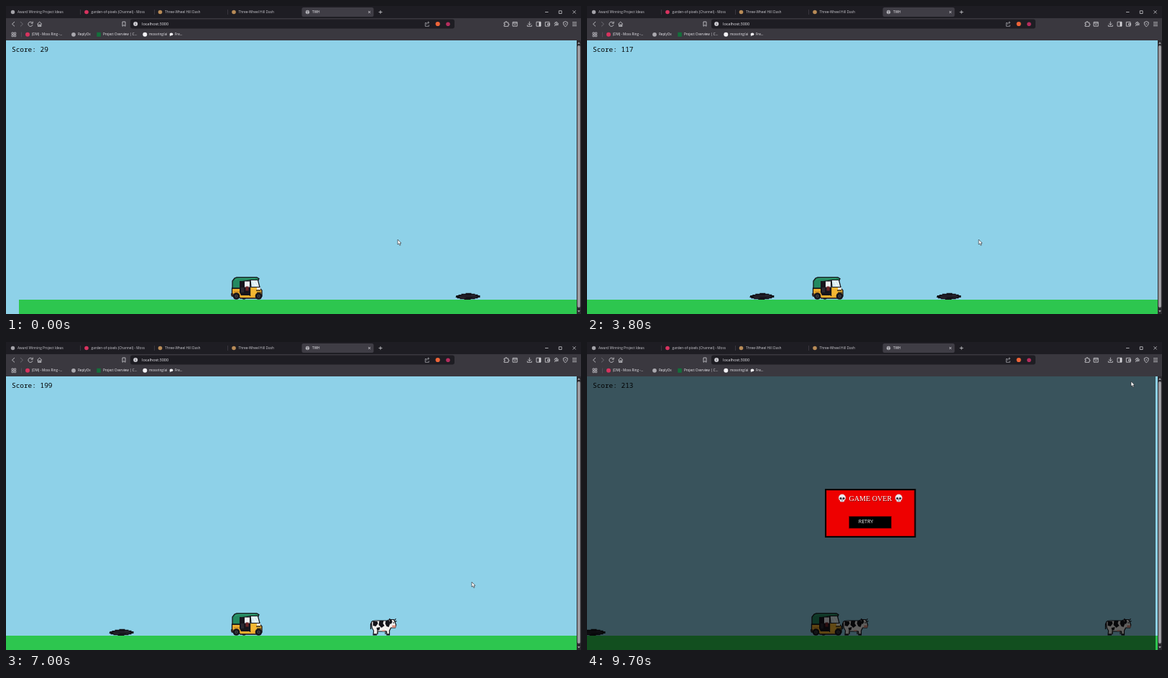
An HTML page with a canvas that plays this animation: 800 by 430 pixels, repeating every 9800 ms.

```html
<!DOCTYPE html>
<html lang="en">
<head>
<meta charset="utf-8">
<title>Rickshaw game</title>
<style>
html, body { margin: 0; width: 100%; height: 100%; overflow: hidden; background: #8ed1e8; }
canvas { display: block; width: 800px; height: 430px; }
</style>
</head>
<body>
<canvas id="stage" width="800" height="430"></canvas>
<script>
const ctx = document.getElementById('stage').getContext('2d');
const LOOP = 9800, STEP = 100, CRASH = 8400;
const SKY = '#8ed1e8', GRASS = '#2dc64f', INK = '#141319';
const BAR = '#3a383f', DARK = '#1e1d23', ICON = '#d4d3d8';
const SANS = '"Open Sans", sans-serif';
const MONO = '"Noto Sans Mono", monospace';
const SERIF = '"Liberation Serif", serif';

// [time, values...] keys, linear in between
const SCROLL = [[0, 0], [1300, 138], [3000, 313], [4800, 507], [7000, 742], [CRASH, 894]];
const POINTER = [[6200, 545, 326], [6900, 648, 335], [7400, 648, 335],
  [8200, 681, 284], [8900, 681, 284], [9700, 757, 55]];
const OBSTACLES = [[hole, 643], [hole, 903], [cow, 1267], [cow, 1633]];
const JUMPS = [2300, 4693], JUMP_SPEED = 541, GRAVITY = 833;

function keyed(keys, t) {
  if (t <= keys[0][0]) return keys[0].slice(1);
  for (let i = 1; i < keys.length; i++) {
    const a = keys[i - 1], b = keys[i];
    if (t <= b[0]) {
      const k = (t - a[0]) / (b[0] - a[0]);
      return a.slice(1).map((v, j) => v + (b[j + 1] - v) * k);
    }
  }
  return keys[keys.length - 1].slice(1);
}

function rect(x, y, w, h, color) {
  ctx.fillStyle = color;
  ctx.fillRect(x, y, w, h);
}
function round(x, y, w, h, r, color) {
  ctx.fillStyle = color;
  ctx.beginPath();
  ctx.roundRect(x, y, w, h, r);
  ctx.fill();
}
function oval(x, y, rx, ry, color) {
  ctx.fillStyle = color;
  ctx.beginPath();
  ctx.ellipse(x, y, rx, ry, 0, 0, 7);
  ctx.fill();
}
const dot = (x, y, r, color) => oval(x, y, r, r, color);
function shape(path, fill, stroke, width = 1) {
  const p = new Path2D(path);
  if (fill) { ctx.fillStyle = fill; ctx.fill(p); }
  if (stroke) { ctx.strokeStyle = stroke; ctx.lineWidth = width; ctx.stroke(p); }
}
const line = (path, color = ICON, width = .8) => shape(path, null, color, width);
function text(str, x, y, font, color) {
  ctx.font = font;
  ctx.fillStyle = color;
  ctx.fillText(str, x, y);
}
function at(x, y, draw) {
  ctx.save();
  ctx.translate(x, y);
  draw();
  ctx.restore();
}

function tabs() {
  rect(0, 0, 800, 17, DARK);
  round(411.5, 2, 100, 13, 2.5, '#3f3d45');
  const label = (str, x, color = '#c9c8ce') => text(str, x, 10.2, '4.8px ' + SANS, color);
  dot(9.5, 8.5, 2.7, '#a3a2a8');
  label('Award Winning Project Ideas', 16);
  dot(112, 8.5, 2.8, '#d8335f');
  ctx.save();
  ctx.beginPath();
  ctx.rect(118, 0, 81, 17);
  ctx.clip();
  label('garden-of-pixels (Channel) - Moss', 118.5);
  ctx.restore();
  for (const x of [214.5, 317]) {
    dot(x, 8.5, 2.8, '#b88b57');
    label('Three-Wheel Hill Dash', x + 6.5);
  }
  for (const x of [103, 206, 308]) rect(x, 5, .7, 7, '#45434c');
  dot(419.5, 8.5, 2.7, '#b9b8be');
  line('M417 7.5h5M417.5 10h4M419.5 6v5', '#66646c', .5);
  label('TWH', 426, '#f0eff4');
  line('M504 7l3 3M507 7l-3 3', '#eeedf2', .7);
  line('M518.5 8.5h5M521 6v5M750 8.5h4.5M769.3 6.7h3.8v3.8h-3.8zM788.5 6.3l4.2 4.2M792.7 6.3l-4.2 4.2', '#e6e5ea', .7);
}

function toolbar() {
  rect(0, 17, 800, 31, BAR);
  round(173, 18.5, 451, 13, 3, DARK);
  line('M12 22l-3.5 3.2L12 28.4');
  line('M20 22l3.5 3.2L20 28.4', '#77757d');
  line('M36.6 23.6A3.1 3.1 0 1 0 37 26.2M37.2 21.6v2.6h-2.6');
  line('M43.5 25.2l3.2-3 3.2 3M44.5 24.8v3.6h4.4v-3.6M46 28v-2h1.5v2');
  line('M162 22h4v6.3l-2-1.7-2 1.7z');
  dot(180.2, 25, 3, '#d2d1d7');
  line('M180.2 24.6v2M180.2 23v.7', DARK, .7);
  text('localhost:3000', 189, 27, '5.5px ' + SANS, '#eeedf2');
  line('M585 23.5h-1.7v4.8h5v-2M585 26c0-2 1-3 3.3-3M587 21.7l1.6 1.4-1.6 1.4', ICON, .6);
  dot(600.7, 25, 3.1, '#ee6438');
  dot(615, 25.2, 2.8, '#b52d5e');
  line('M693 23h2v-1.2h1.6V23h2.2v2h1v1.6h-1V28.4H693v-2h1.1v-1.5H693z');
  line('M705 22.4h6.2v5.8H705zM705 24h6.2M707 26h2.2');
  line('M728.3 21.7v4.6M726.2 24.5l2.1 2.1 2.1-2.1M725.3 26.5v1.8h6v-1.8');
  line('M738 22.2h6v6h-6z');
  rect(741.5, 22.2, 2.5, 6, ICON);
  line('M750.3 22.4h5.7v5.8h-5.7zM753.5 24.5h3v2h-3z');
  line('M763 28l4-4.2M764 22.5l4.5 4.5M763 24.5l3-2.5 2.6 3-3 2.2z');
  line('M778.3 21.6l3 1.2c0 3-.8 4.8-3 5.9-2.2-1.1-3-2.9-3-5.9zM777.3 25h2');
  line('M788 22.8h6M788 25.2h6M788 27.6h6');

  for (const [x, y] of [[8, 37], [11.4, 37], [8, 40.4], [11.4, 40.4]])
    line(`M${x} ${y}h2.3v2.3h-2.3z`, ICON, .7);
  rect(21, 36.5, .7, 7, '#5a5861');
  const label = (str, x) => text(str, x, 41.4, '4.6px ' + SANS, '#eeedf2');
  dot(30, 39.8, 3, '#d8335f');
  label('(DM) - Moss Ring -...', 36);
  dot(94, 39.8, 2.9, '#aaa9af');
  label('ReplyOx', 100);
  rect(126.3, 36.8, 5.5, 6, '#14703b');
  label('Project Overview | C...', 135);
  dot(193.3, 39.8, 3, '#f4f3f7');
  label('mossring/ai', 199);
  oval(230, 39.4, 2.4, 1.8, '#f4f3f7');
  shape('M228 40l-.2 2.3 2-1.2z', '#f4f3f7');
  label('Fre...', 235);
}

function scrollbar() {
  rect(794, 48, 6, 382, '#2b2a2f');
  round(795, 55, 4, 366, 2, '#9c9ba0');
  shape('M795.2 52.8l1.8-2.6 1.8 2.6zM795.2 425l1.8 2.6 1.8-2.6z', '#a9a8ad');
}

// Centre x, standing on the ground line
function hole(x) {
  at(x, 405.5, () => {
    shape('M-16.5-1.5h3v-1h4v-1.2h6v-1h8v1h5v1h4v1.2h3v3h-3v1.2h-4v1h-6v.9h-9v-.9h-6v-1h-4v-1.2h-2z', '#100f15');
    oval(0, .2, 12.5, 3, '#1f1d26');
    rect(-11, 1, 6, 1, '#30282c');
    rect(4, -2, 6, 1, '#302d38');
    rect(-3, 1.4, 9, .9, '#0b0a0f');
  });
}

function cow(x) {
  at(x - 18.5, 386, () => {
    shape('M2.5 5L1 8v7', null, INK, 1.4);
    const body = 'M2 5Q3 3 8 3H24l3-1.5h6l1.5 3 1.7 4.5-1.2 4H29l-2 4v6h-3.5l-.5-5H11l-2 5H4.5l.5-6Q2 13 2 8z';
    shape(body, '#f2efed', INK, 1.2);
    shape('M4 4h6l1 3-3 4-4-1zM13 3h6l-1 4 2 3-4 3-4-4zM22 3h4l2 4-2 5-3-1-2-4zM27 2h3l1 3-2 3-2-2zM9 13l5-1-1 4-3 1z', INK);
    rect(30.8, 9.5, 5, 3.2, '#d98d80');
    rect(32, 5.2, 1.3, 1.6, INK);
    rect(17, 16, 4, 2, '#dc9f94');
    shape('M26.5 4l-2-1.8M28 2l-1-2M34 2.4l2-2M34.5 4.3l2.5-.6', null, INK, 1.3);
    rect(4.5, 21.3, 4.2, 1.8, INK);
    rect(23.2, 21.3, 4.2, 1.8, INK);
    shape('M10.5 17v5M21.5 17v5', null, '#4a4548', 1.6);
  });
}

function wheel(x, y, r) {
  dot(x, y, r, INK);
  dot(x, y, r * .48, '#44434b');
  dot(x, y, r * .2, '#15141a');
}

function rickshaw(x, y) {
  at(x, y, () => {
    wheel(18, 28.8, 3);
    shape('M1.5 16H40l3 3v8H38l-3 3H13L10 27H1.5z', '#eeae2f', INK, 1.3);
    shape('M2 16V6L5 2 8 .8H36l3 2-1 2H27L13 7v9z', '#23895f', INK, 1.3);
    line('M6 4.5Q9 2.5 13 2.5H34', '#35a578', .9);
    shape('M12 6h15v20H14l-2-4z', '#17151c');
    rect(19, 6.5, 7, 8, '#eeeff1');
    shape('M20.5 13.5h4v6h-4z', '#6e2426');
    rect(14, 15, 4, 7, '#2b2830');
    shape('M27 4.5h10.5l2.5 10H28z', '#d9edf2', INK, 1.2);
    line('M31 6l4 7M35 6l2.5 5', '#ffffff', 1);
    shape('M27 15h11l3 3-3 8H27z', '#f3b733');
    rect(36, 15, 5, 3, '#f2eee2');
    rect(35, 18.5, 6, 1.2, INK);
    rect(4, 20.5, 8, 1, '#b87920');
    line('M26.6 5v22M36 22h6', INK, 1.2);
    rect(0, 23, 3, 3.5, '#352a2c');
    wheel(7.5, 27, 4.8);
    wheel(38.5, 27, 4.8);
  });
}

function jumpHeight(t) {
  for (const start of JUMPS) {
    const s = (t - start) / 1000;
    const h = JUMP_SPEED * s - GRAVITY * s * s / 2;
    if (s > 0 && h > 0) return h;
  }
  return 0;
}

function scoreAt(t) {
  const alive = Math.min(t, CRASH);
  return 29 + Math.floor(alive / 100) + 50 * JUMPS.filter(j => alive > j).length;
}

function skull(x, y) {
  at(x, y, () => {
    dot(0, -.8, 4.9, '#eceaf0');
    round(-3, 1, 6, 4, 1.2, '#dedbe4');
    oval(-2, 0, 1.5, 1.6, '#302a35');
    oval(2, 0, 1.5, 1.6, '#302a35');
    shape('M0 1.3l.8 1.3h-1.6z', '#302a35');
    line('M-1.2 3.5v1.5M0 3.5v1.5M1.2 3.5v1.5', '#736b78', .4);
  });
}

function gameOver(t) {
  rect(0, 48, 791, 382, 'rgba(0,0,0,.6)');
  rect(331, 205, 126.5, 68, '#080000');
  rect(333, 207, 122.5, 64, '#c80000');
  rect(333.7, 207.7, 121, 62.5, '#ee0000');
  skull(355, 218.3);
  skull(433.7, 218.3);
  text('GAME OVER', 365, 222.6, '10.1px ' + SERIF, '#6a0000');
  text('GAME OVER', 364.5, 222, '10.1px ' + SERIF, '#ffffff');
  if ((t - CRASH) % 800 < 400)
    text('Score: ' + scoreAt(t), 357, 237, '8.33px ' + SERIF, '#ffe04a');
  rect(364, 243, 60, 17.5, '#8e0000');
  rect(365, 243.8, 58, 16, '#000000');
  text('RETRY', 377.8, 253.3, '7px ' + SANS, '#ffffff');
}

function pointer(x, y) {
  at(x, y, () => shape('M0 0v7l1.6-1.4 1.2 2.6 1.2-.6-1.1-2.5h2z', '#ffffff', '#202024', .6));
}

function render(t) {
  const [moved] = keyed(SCROLL, t);
  const crashed = t >= CRASH;
  rect(0, 48, 800, 382, SKY);
  const edge = Math.max(0, 18 - moved);
  rect(edge, 410, 800 - edge, 20, GRASS);
  for (const [draw, start] of OBSTACLES) {
    const x = start - moved;
    if (x > -25 && x < 820) draw(x);
  }
  rickshaw(crashed ? 311 : 313, 378 - jumpHeight(t));
  text('Score: ' + scoreAt(t), 8, 64, '9.42px ' + MONO, '#000000');
  if (crashed) gameOver(t);
  scrollbar();
  tabs();
  toolbar();
  pointer(...keyed(POINTER, t));
}

function frame(now) {
  render(Math.floor(now % LOOP / STEP) * STEP);
  requestAnimationFrame(frame);
}
render(0);
requestAnimationFrame(frame);
</script>
</body>
</html>
```
